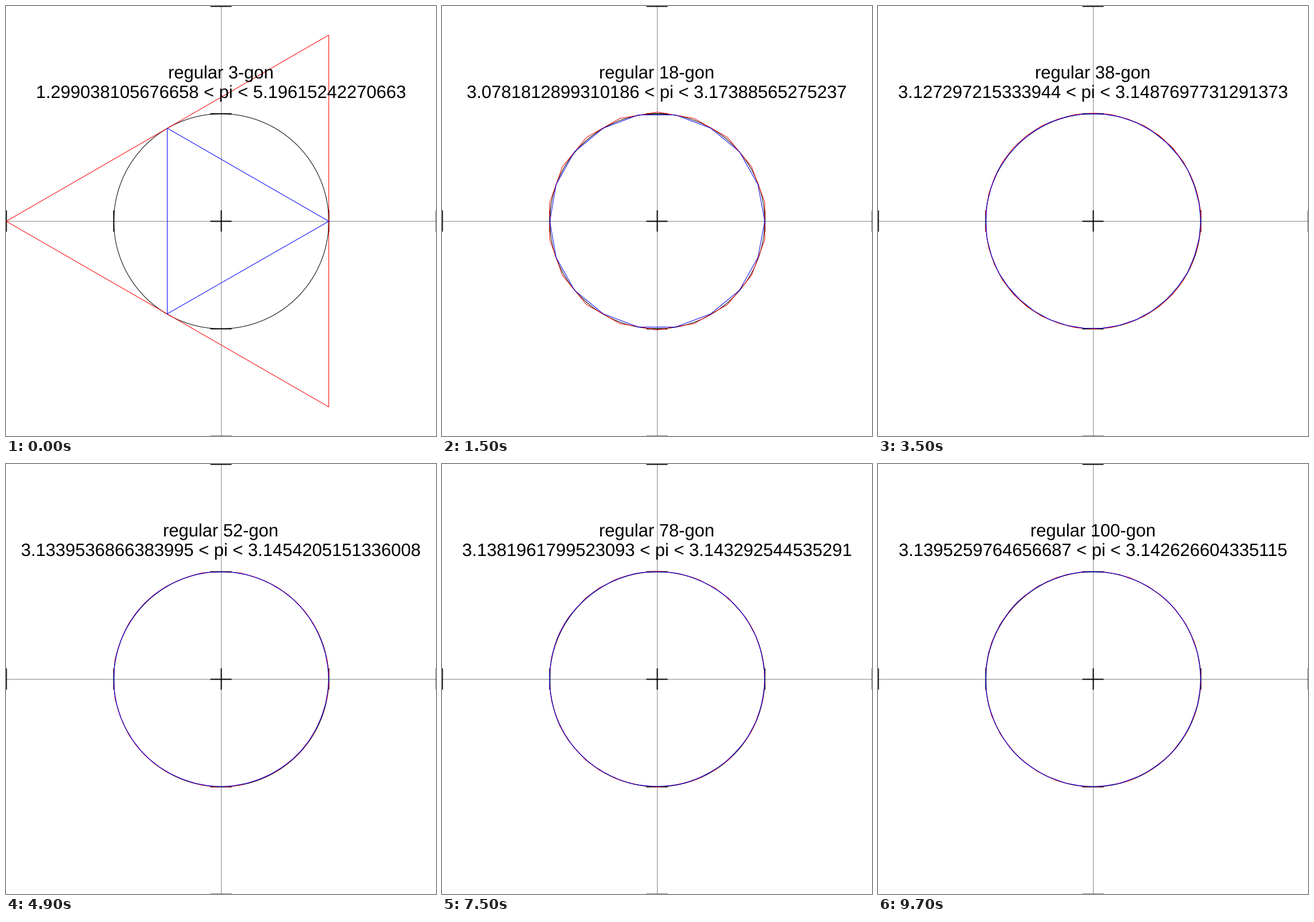
A matplotlib script that plays this animation: 748 by 748 pixels, repeating every 9800 ms.

```python
import math

import matplotlib.pyplot as plt
import numpy as np
from matplotlib.animation import FuncAnimation
from matplotlib.patches import Circle, Polygon

SIZE, DPI = 748, 100
MID, UNIT = SIZE / 2, SIZE / 4
PX = 72 / DPI  # points per pixel
FIRST, LAST = 3, 100

plt.rcParams["font.family"] = "Liberation Sans"
plt.rcParams["text.hinting"] = "none"

fig = plt.figure(figsize=(SIZE / DPI, SIZE / DPI), dpi=DPI, facecolor="white")
ax = fig.add_axes([0, 0, 1, 1])
ax.set_xlim(0, SIZE)
ax.set_ylim(SIZE, 0)
ax.axis("off")


def snap(values):
    """Move coordinates to the centre of their pixel."""
    return np.floor(np.asarray(values) + 1e-6) + 0.5


def segment(xs, ys, color, width):
    ax.plot(snap(xs), snap(ys), color=color, lw=width * PX,
            solid_capstyle="butt", snap=False, zorder=1)


def outline(color, zorder):
    patch = Polygon([(0, 0), (1, 1), (1, 0)], closed=True, fill=False,
                    ec=color, lw=PX, joinstyle="miter", snap=False,
                    zorder=zorder)
    return ax.add_patch(patch)


def label(baseline):
    return ax.text(MID - 0.3, baseline, "", size=30.9 * PX, ha="center",
                   va="baseline", color="black", zorder=5)


def corners(n, radius, turn):
    angles = 2 * np.pi * (np.arange(n) + turn) / n
    x = MID + UNIT * radius * np.cos(angles)
    y = MID - UNIT * radius * np.sin(angles)
    return snap(np.column_stack([x, y]))


# Axes with a tick at every unit
segment([0, SIZE], [MID, MID], "#888888", 1)
segment([MID, MID], [0, SIZE], "#888888", 1)
for k in range(-2, 3):
    at = MID + k * UNIT
    ends = [MID - UNIT / 10, MID + UNIT / 10]
    segment([at, at], ends, "black", 2)
    segment(ends, [at, at], "black", 2)

ax.add_patch(Circle((MID + 0.5, MID + 0.5), UNIT, fill=False, ec="black",
                    lw=PX, snap=False, zorder=2))
outer = outline("#ff0000", 3)
inner = outline("#0000ff", 4)
title = label(126)
bounds = label(159.5)


def draw(i):
    n = FIRST + i
    outer.set_xy(corners(n, 1 / math.cos(math.pi / n), 0.5))
    inner.set_xy(corners(n, 1, 0))
    low = n / 2 * math.sin(2 * math.pi / n)
    high = n * math.tan(math.pi / n)
    title.set_text(f"regular {n}-gon")
    bounds.set_text(f"{low} < pi < {high}")
    return outer, inner, title, bounds


anim = FuncAnimation(fig, draw, frames=LAST - FIRST + 1, interval=100,
                     repeat=True, repeat_delay=0)
plt.show()
```
